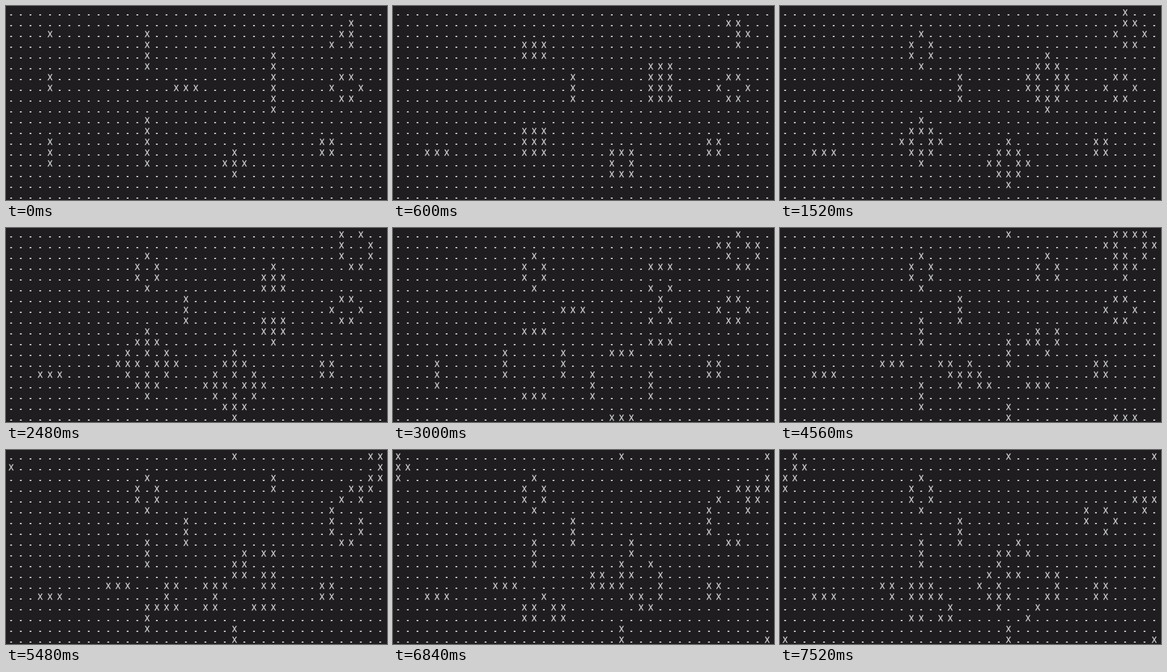
Animation of 600x306 px, one loop 8 s. Source, as an HTML page:

```html
<!DOCTYPE html>
<html lang="en">
<head>
<meta charset="utf-8">
<title>Life</title>
<style>
  html, body { margin: 0; width: 100%; height: 100%; overflow: hidden; background: #1f1d20; }
  svg { display: block; width: 100vw; height: 100vh; }
  text {
    font-family: "DejaVu Sans Mono", monospace;
    fill: #cdcdcd;
    text-anchor: middle;
    text-rendering: geometricPrecision;
  }
  #marks text { font-size: 12.7px; stroke: #cdcdcd; stroke-width: .4px; }
  #dots text { font-size: 11px; font-weight: bold; }
  /* Struck twice, one pixel apart, so the dots come out wide and flat */
  #dots { filter: drop-shadow(1px 0 0 #cdcdcd); }
</style>
</head>
<body>
<svg viewBox="0 0 600 306">
  <g id="dots"></g>
  <g id="marks"></g>
</svg>
<script>
const COLS = 39, ROWS = 18, LOOP = 8000;
const PITCH_X = 15.3, PITCH_Y = 17, LEFT = 8, BASELINE = 15.1;
const TICK = 40, STEP = 500.1, LEAD = 21.2;

// Starting shapes: column, row, then rows of the pattern
const shapes = [
  [4, 2, "X"],
  [4, 6, "X/X"],
  [4, 12, "X/X/X"],
  [14, 2, "X/X/X/X"],
  [14, 10, "X/X/X/X/X"],
  [17, 7, "XXX"],
  [27, 4, "X/X/X/X/X/X"],
  [33, 1, "..X/.XX/X.X"],
  [33, 6, ".XX./X..X/.XX."],
  [32, 12, "XX/XX"],
  [22, 13, ".X./XXX/.X."]
];

// The board wraps at all four edges
const at = (c, r) => (r + ROWS) % ROWS * COLS + (c + COLS) % COLS;

function seed() {
  const board = new Uint8Array(COLS * ROWS);
  for (const [c, r, art] of shapes)
    art.split("/").forEach((line, y) =>
      [...line].forEach((ch, x) => { if (ch === "X") board[at(c + x, r + y)] = 1; }));
  return board;
}

function evolve(board) {
  return board.map((alive, i) => {
    const c = i % COLS, r = Math.floor(i / COLS);
    let near = -alive;
    for (let y = -1; y <= 1; y++)
      for (let x = -1; x <= 1; x++) near += board[at(c + x, r + y)];
    return near === 3 || (alive && near === 2) ? 1 : 0;
  });
}

const boards = [seed()];
while (boards.length * STEP - LEAD < LOOP) boards.push(evolve(boards[boards.length - 1]));

// One glyph per cell, all in the layer with the given id
function layer(id, glyph, shift) {
  const group = document.getElementById(id);
  return Array.from({ length: COLS * ROWS }, (_, i) => {
    const cell = document.createElementNS(group.namespaceURI, "text");
    cell.setAttribute("x", LEFT + shift + i % COLS * PITCH_X);
    cell.setAttribute("y", BASELINE + Math.floor(i / COLS) * PITCH_Y);
    cell.textContent = glyph;
    return group.appendChild(cell);
  });
}

const dots = layer("dots", ".", -0.5);
const marks = layer("marks", "X", 0);

const show = (cell, on) => { cell.style.display = on ? "" : "none"; };
let shown = -1;

function draw(time) {
  const t = Math.floor(time % LOOP / TICK) * TICK;
  const gen = Math.min(Math.floor((t + LEAD) / STEP), boards.length - 1);
  if (gen === shown) return;
  shown = gen;
  boards[gen].forEach((alive, i) => {
    show(marks[i], alive);
    show(dots[i], !alive);
  });
}

const start = performance.now();
function loop() {
  draw(performance.now() - start);
  requestAnimationFrame(loop);
}
loop();
</script>
</body>
</html>
```
